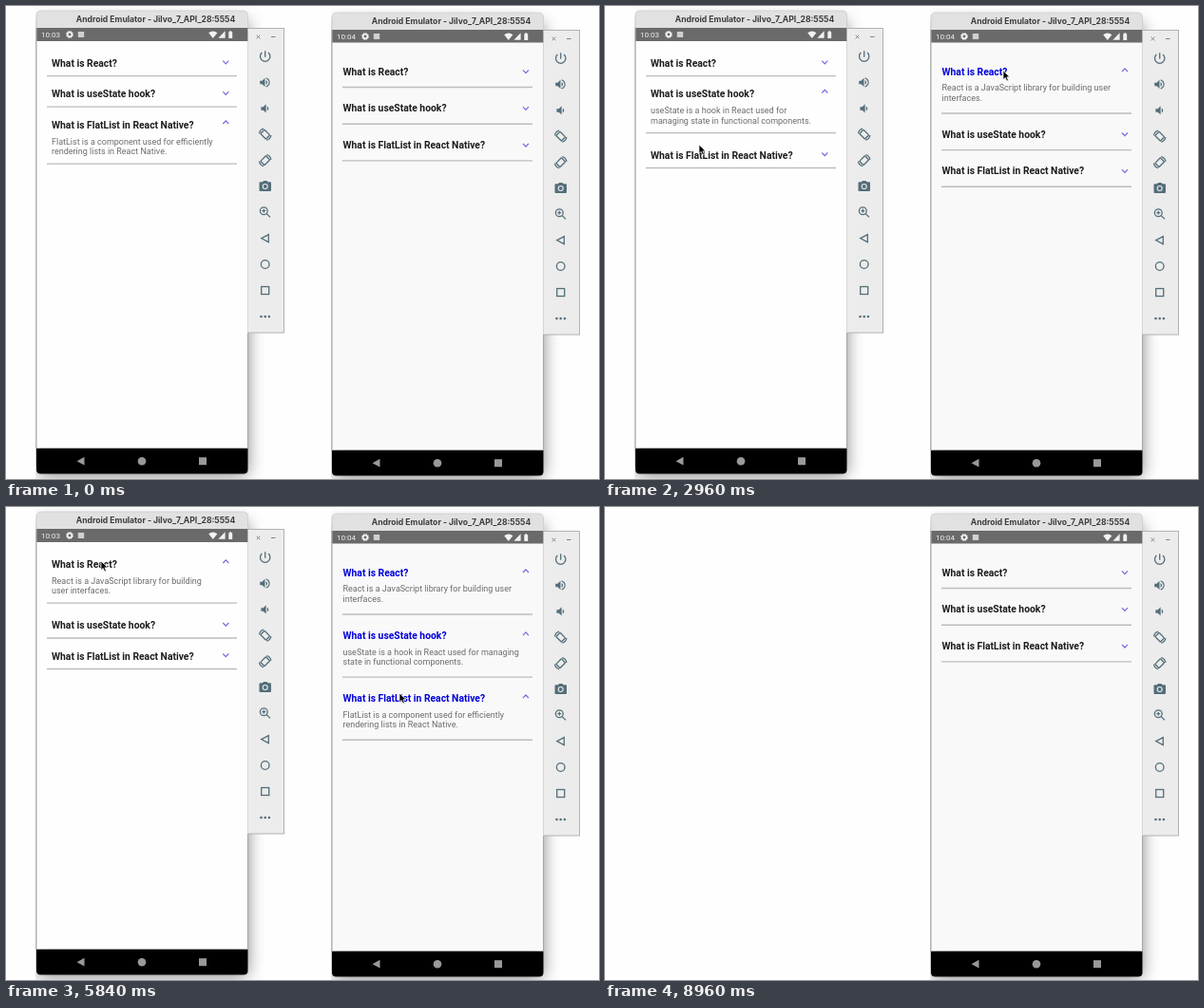
Recreate the animation shown at these times as an HTML page. Size 624 by 498 pixels, loop 9.28 s.

```html
<!DOCTYPE html>
<html lang="en">
<head>
<meta charset="utf-8">
<title>Accordion comparison</title>
<style>
html, body { margin: 0; width: 100%; height: 100%; overflow: hidden; background: #fdfefd; }
svg { display: block; width: 624px; height: 498px; }
text { font-family: Roboto, "Liberation Sans", sans-serif; }
.title { font: 700 8.6px Inter, "Liberation Sans", sans-serif; fill: #3c3c3c; text-anchor: middle; }
.clock { font-size: 8.1px; fill: #f2f2f2; }
.head { font-size: 10.35px; font-weight: 700; }
.body { font-size: 9px; fill: #6c6c6c; }
.rule { stroke: #bcbcbc; stroke-width: 1.4; }
.chev { fill: none; stroke: #6f6cdc; stroke-width: 1.2; }
.line { fill: none; stroke: #546e7a; stroke-width: 1.3; }
.solid { fill: #546e7a; }
</style>
</head>
<body>
<svg viewBox="0 0 624 498">
  <defs>
    <filter id="blur" x="-30%" y="-20%" width="160%" height="140%"><feGaussianBlur stdDeviation="9"/></filter>
    <clipPath id="crop"><rect x="31" y="0" width="262" height="498"/></clipPath>
    <path id="arrow" d="M0 0V9.4L2.2 7.4 3.8 11 5.4 10.3 3.9 6.8H6.9Z" fill="#000" stroke="#fff" stroke-width=".7"/>
    <g id="turn" class="line">
      <rect x="-4" y="-3" width="8" height="6" rx=".8" transform="rotate(45)"/>
      <path d="M-6.2 -.8A6.2 6.2 0 0 1 -1.5 -6M6.2 .8A6.2 6.2 0 0 1 1.5 6"/>
    </g>
    <g id="frame">
      <rect x="33" y="16" width="221" height="478" rx="6" filter="url(#blur)" opacity=".5"/>
      <path d="M32 24V10Q32 5 37 5H249.500Q254.500 5 254.500 10V24Z" fill="#e2e1e2" stroke="#c4c4c4" stroke-width=".6"/>
      <text class="title" x="157.500" y="17.200">Android Emulator - Jilvo_7_API_28:5554</text>
      <rect x="32" y="23" width="222.500" height="14" fill="#6a6a6a"/>
      <path d="M32 465.500H254.500V488Q254.500 492.500 250 492.500H36.500Q32 492.500 32 488Z"/>
      <g fill="#999">
        <path d="M74.500 479.200L82.500 474.800V483.600Z"/>
        <circle cx="143" cy="479.200" r="4.300"/>
        <rect x="203" y="475.200" width="8" height="8"/>
      </g>
      <g fill="#f2f2f2">
        <circle cx="67" cy="30" r="2.300" fill="none" stroke="#f2f2f2" stroke-width="1.700"/>
        <circle cx="67" cy="30" r="3.300" fill="none" stroke="#f2f2f2" stroke-width="1.100" stroke-dasharray="1.500 1.090"/>
        <rect x="75.800" y="27" width="6.400" height="6" fill="#d0d0d0"/>
        <path d="M217.800 34L213.200 28.200Q217.800 24.600 222.400 28.200Z"/>
        <path d="M223.400 33.700H230.600V26.300Z"/>
        <path d="M234.300 34V27.200H235.300V26.200H237.200V27.200H238.200V34Z"/>
      </g>
      <rect x="254.500" y="23.500" width="38" height="320.500" fill="#ececec" stroke="#b2b2b2"/>
      <path d="M263.700 30.700L267.300 34.300M267.300 30.700L263.700 34.300M279 32.500H283.500" stroke="#777" fill="none" stroke-width=".9"/>
      <g class="line" transform="translate(272.700 53.300)"><path d="M0 -6V.5M-3.300 -4.200A5.200 5.200 0 1 0 3.300 -4.200"/></g>
      <g class="solid">
        <path transform="translate(265.500 73.500) scale(.58)" d="M3 9v6h4l5 5V4L7 9H3zm13.500 3c0-1.770-1.020-3.290-2.500-4.030v8.050c1.480-.73 2.500-2.250 2.500-4.020zM14 3.230v2.060c2.890.86 5 3.540 5 6.710s-2.110 5.850-5 6.710v2.060c4.010-.91 7-4.490 7-8.770s-2.990-7.860-7-8.770z"/>
        <path transform="translate(265.500 101) scale(.58)" d="M18.500 12c0-1.770-1.020-3.290-2.500-4.030v8.050c1.480-.73 2.500-2.250 2.500-4.020zM5 9v6h4l5 5V4L9 9H5z"/>
        <path d="M268 185.300H270L271 184H274.500L275.500 185.300H278Q279 185.300 279 186.300V194Q279 195 278 195H267.500Q266.500 195 266.500 194V186.300Q266.500 185.300 267.500 185.300Z"/>
        <circle cx="268.500" cy="327" r="1.300"/><circle cx="272.700" cy="327" r="1.300"/><circle cx="276.900" cy="327" r="1.300"/>
      </g>
      <circle cx="272.700" cy="190" r="2.500" fill="#546e7a" stroke="#ececec" stroke-width="1.100"/>
      <use href="#turn" x="272.700" y="135.200"/>
      <use href="#turn" transform="translate(272.700 162.700) scale(-1 1)"/>
      <g class="line">
        <circle cx="271.300" cy="215.700" r="3.900"/>
        <path d="M274.200 218.600L278 222.400M269.400 215.700H273.200M271.300 213.800V217.600"/>
        <path d="M268.700 244.600L276.300 240.600V248.600Z"/>
        <circle cx="272.700" cy="272" r="4.300"/>
        <rect x="268.700" y="295.500" width="8" height="8"/>
      </g>
    </g>
  </defs>
  <g id="left">
    <g clip-path="url(#crop)">
      <use href="#frame"/>
      <rect x="32" y="37" width="222.500" height="428.500" fill="#fefefe"/>
      <path d="M32 23V466M254.500 344V466" stroke="#a3aaa5"/>
      <text class="clock" x="37" y="33">10:03</text>
    </g>
    <g id="leftList"></g>
  </g>
  <g transform="translate(311 2)" clip-path="url(#crop)">
    <use href="#frame"/>
    <rect x="32" y="36.500" width="222.500" height="429" fill="#f9f9f9"/>
    <path d="M32 23V466M254.500 344V466" stroke="#a3aaa5"/>
    <text class="clock" x="37" y="32.700">10:04</text>
  </g>
  <g id="rightList"></g>
  <use id="leftCursor" href="#arrow"/>
  <use id="rightCursor" href="#arrow"/>
</svg>
<script>
const LOOP = 9280, STEP = 80, LEFT_END = 8960;
const $ = id => document.getElementById(id);

const heads = ["What is React?", "What is useState hook?", "What is FlatList in React Native?"];
const leftBody = [
  ["React is a JavaScript library for building", "user interfaces."],
  ["useState is a hook in React used for", "managing state in functional components."],
  ["FlatList is a component used for efficiently", "rendering lists in React Native."]
];
const rightBody = [
  ["React is a JavaScript library for building user", "interfaces."],
  ["useState is a hook in React used for managing", "state in functional components."],
  leftBody[2]
];

// [time, item]: the left list keeps one item open at a time
const leftTaps = [[0, 2], [1280, 0], [2240, 1], [3680, 2], [4640, 1], [5360, 0]];
// per item on the right: release times of the opening and closing taps
const rightTaps = [[2700, 8040], [4000, 7080], [5040, 6320]];

// [time, x, y]
const leftPath = [[320, 70, 130], [1040, 112, 64.5], [1600, 112, 64.5], [2160, 106, 122],
  [2560, 104, 122], [2960, 99, 146], [3680, 99, 146], [4080, 99, 111], [4480, 101, 89],
  [4880, 101, 89], [5120, 101, 66.5], [5360, 100, 57]];
const rightPath = [[320, 575, 238], [1120, 433, 83], [1600, 433, 83], [2320, 419, 68],
  [3600, 419, 68], [3920, 419, 132], [4480, 419, 132], [4800, 414, 196], [6400, 414, 196],
  [6720, 414, 136], [7160, 414, 136], [7600, 414, 71], [8120, 414, 71], [8480, 584, 240]];

const clamp = v => Math.min(1, Math.max(0, v));
const ease = v => { v = clamp(v); return v * v * (3 - 2 * v); };

function along(path, t) {
  let i = 0;
  while (i < path.length - 2 && t >= path[i + 1][0]) i++;
  const [a, b] = [path[i], path[i + 1]];
  const k = ease((t - a[0]) / (b[0] - a[0]));
  return [a[1] + (b[1] - a[1]) * k, a[2] + (b[2] - a[2]) * k];
}

function place(cursor, path, t, end) {
  const [x, y] = along(path, t);
  cursor.setAttribute("transform", `translate(${x} ${y})`);
  cursor.setAttribute("visibility", t >= path[0][0] && t < end ? "visible" : "hidden");
}

// touch feedback: dims while pressed, recovers after release
function touch(t, release) {
  const press = release - 120;
  if (t < press || t > release + 250) return 1;
  return t < release ? 1 - .8 * ease((t - press) / 120) : .2 + .8 * ease((t - release) / 250);
}

function list(o, bodies, open, alpha) {
  let y = o.y, out = "";
  heads.forEach((head, i) => {
    const on = open[i], cy = y + (on ? o.upY : o.downY), d = on ? -1.6 : 1.6;
    const ruleY = y + o.rule + (on ? 27.5 : 0);
    out += `<g opacity="${alpha[i]}">
      <text class="head" x="${o.x}" y="${y + 3.7}" fill="${on ? o.active : "#1c1c1c"}">${head}</text>
      <path class="chev" d="M${o.x + o.chev - 3} ${cy - d}l3 ${2 * d}l3 ${-2 * d}"/></g>`;
    if (on) bodies[i].forEach((line, n) =>
      out += `<text class="body" x="${o.x}" y="${y + 20.6 + n * 10.7}">${line}</text>`);
    out += `<path class="rule" d="M${o.lineX} ${ruleY}h200"/>`;
    y += on ? o.openStep : o.step;
  });
  return out;
}

const leftStyle = { x: 48, y: 60, lineX: 43, chev: 183.3, rule: 13.6, step: 32.5, openStep: 64.4,
  upY: -2.6, downY: -.8, active: "#1c1c1c" };
const rightStyle = { x: 354.5, y: 68.8, lineX: 354, chev: 192.5, rule: 16.7, step: 38.7, openStep: 66.1,
  upY: -1.4, downY: .2, active: "#0000dc" };

let last = -1;
function draw(now) {
  const t = Math.floor(now % LOOP / STEP) * STEP;
  if (t !== last) {
    last = t;
    const current = leftTaps.filter(tap => tap[0] <= t).pop()[1];
    $("left").setAttribute("visibility", t < LEFT_END ? "visible" : "hidden");
    $("leftList").innerHTML = list(leftStyle, leftBody, heads.map((_, i) => i === current), [1, 1, 1]);
    $("rightList").innerHTML = list(rightStyle, rightBody,
      rightTaps.map(([a, b]) => t >= a && t < b),
      rightTaps.map(([a, b]) => touch(t, a) * touch(t, b)));
    place($("leftCursor"), leftPath, t, LEFT_END);
    place($("rightCursor"), rightPath, t, 8480);
  }
  requestAnimationFrame(draw);
}
const start = performance.now();
const tick = () => draw(Math.max(0, performance.now() - start));
draw = (paint => now => paint(Math.max(0, now - start)))(draw);
tick();
</script>
</body>
</html>
```
